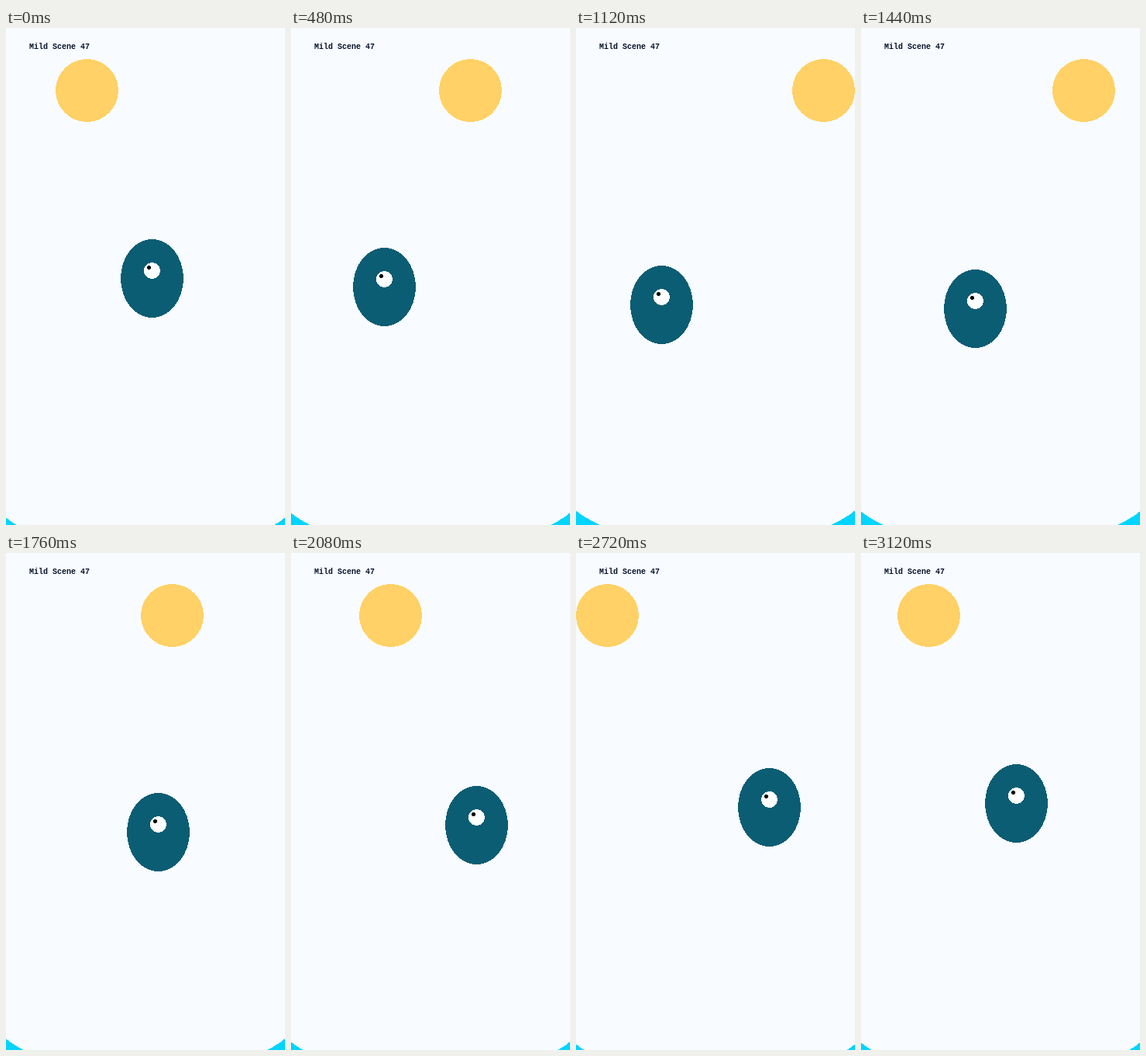
Animation of 360 by 640 pixels, one loop 3.2 s. Source, as an HTML page:

```html
<!DOCTYPE html>
<html lang="en">
<head>
<meta charset="utf-8">
<title>Mild Scene 47</title>
<style>
  html, body { margin: 0; width: 100%; height: 100%; overflow: hidden; background: #f8fbff; }
  svg { display: block; width: 360px; height: 640px; shape-rendering: crispEdges; }
  text { font: bold 10px "Liberation Mono", "Courier New", monospace; fill: #06122b; }
</style>
</head>
<body>
<svg viewBox="0 0 360 640">
  <rect width="360" height="640" fill="#f8fbff"/>
  <path id="water" fill="#00d4ff" fill-rule="evenodd"
    d="M-230 0A230 110 0 0 0 230 0H200A200 80 0 0 1 -200 0Z"/>
  <circle id="sun" r="40.5" fill="#ffd166"/>
  <g id="creature">
    <ellipse rx="40.5" ry="50.5" fill="#0b5d73"/>
    <circle cy="-10" r="10.5" fill="#fff"/>
    <circle cx="-4" cy="-14" r="2.5" fill="#000"/>
  </g>
  <text x="30" y="27">Mild Scene 47</text>
</svg>
<script>
  const STEP = 80, STEPS = 40;
  const [water, sun, creature] = ["water", "sun", "creature"].map(id => document.getElementById(id));

  // Positions snap to whole pixels; shapes are centred on a pixel.
  const swing = (middle, reach, angle) => Math.floor(middle + reach * Math.sin(angle)) + 0.5;
  const place = (el, x, y) => el.setAttribute("transform", `translate(${x} ${y})`);

  function draw(ms) {
    const angle = Math.floor(ms / STEP) % STEPS / STEPS * 2 * Math.PI;
    const drift = angle - 0.18 * Math.PI;
    place(sun, swing(180, 140, drift), 80.5);
    place(water, 180, swing(592, -6, drift));
    place(creature, swing(180, -80, angle - 0.104), swing(342, 20, angle - 1.389));
  }

  const start = performance.now();
  function tick() {
    draw(performance.now() - start);
    requestAnimationFrame(tick);
  }
  tick();
</script>
</body>
</html>
```
